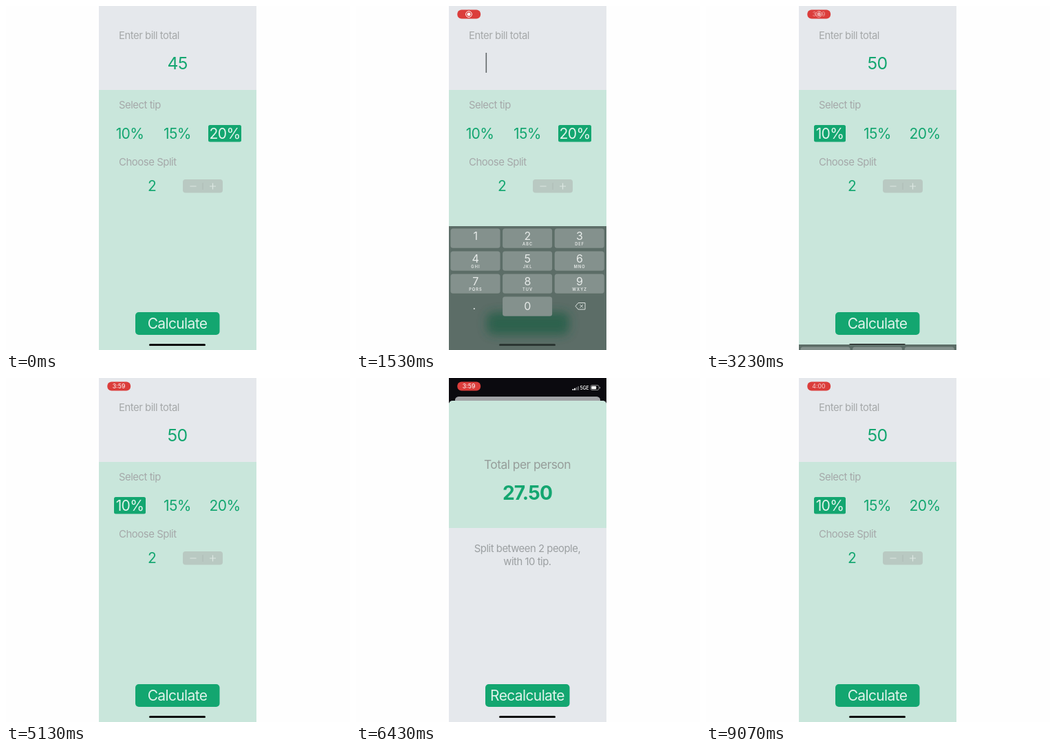
These frames come from a looping animation (500x500 px, 9.11 s). An HTML page:

```html
<!DOCTYPE html>
<html lang="en">
<head>
<meta charset="utf-8">
<title>Tip calculator</title>
<style>
  html, body { margin: 0; width: 100%; height: 100%; overflow: hidden; background: #fefefe; }
  svg { display: block; width: 100vw; height: 100vh; }
  text { font-family: Inter, "Liberation Sans", sans-serif; letter-spacing: -.03em; }
</style>
</head>
<body>
<svg id="stage" viewBox="0 0 500 500"></svg>
<script>
const LOOP = 9110;
const GREEN = '#13a670', MINT = '#c9e6db', PALE = '#e5e8ec', GREY = '#a5a8a9';
const ON_GREEN = '#e0f3eb', KEY = '#84918d', KEY_TEXT = '#e6eae8';
const KEYBOARD_HEIGHT = 180, SHEET_TRAVEL = 468;

const clamp = v => Math.min(1, Math.max(0, v));
const ramp = (t, start, length) => clamp((t - start) / length);
const easeOut = u => 1 - (1 - u) ** 3;
const easeInOut = u => u * u * (3 - 2 * u);
const mix = (a, b, u) => a + (b - a) * u;

const rect = (x, y, w, h, fill, r = 0, extra = '') =>
  `<rect x="${x}" y="${y}" width="${w}" height="${h}" rx="${r}" fill="${fill}" ${extra}/>`;
const label = (x, middle, size, fill, content, extra = 'text-anchor="middle"') =>
  `<text x="${x}" y="${middle + size * .36}" font-size="${size}" fill="${fill}" ${extra}>${content}</text>`;
const stroke = (d, color, width) =>
  `<path d="${d}" fill="none" stroke="${color}" stroke-width="${width}"/>`;
const button = (id, name) =>
  rect(188, 445, 122.5, 33, GREEN, 5) + label(249, 461.5, 21, ON_GREEN, name, `id="${id}" text-anchor="middle"`);
const homeBar = rect(208, 491, 82, 3, '#0b0b0b', 1.5);

const tips = [
  { name: '10%', x: 180, left: 157, width: 46 },
  { name: '15%', x: 249, left: 226, width: 46 },
  { name: '20%', x: 318, left: 294, width: 48 }
];

function mainScreen() {
  const left = 'text-anchor="start"';
  return rect(135, -10, 229, 520, PALE) +
    rect(135, 122, 229, 388, MINT) +
    label(164, 42.5, 14.8, GREY, 'Enter bill total', left) +
    label(249, 83, 24.8, GREEN, '', 'id="bill" text-anchor="middle"') +
    rect(188, 68, 1.6, 29, '#63686a', 0, 'id="caret"') +
    label(164, 143.5, 14.8, GREY, 'Select tip', left) +
    tips.map((tip, i) =>
      rect(tip.left, 173, tip.width, 24.5, GREEN, 2.5, `id="tipBox${i}"`) +
      label(tip.x, 185.3, 21.1, GREEN, tip.name, `id="tip${i}" text-anchor="middle"`)).join('') +
    label(164, 227, 14.9, GREY, 'Choose Split', left) +
    label(212, 261.3, 21, GREEN, '2') +
    rect(257, 252, 58, 19.5, '#b9c9c2', 4) +
    stroke('M286 257v10', '#aab8b2', .8) +
    stroke('M267.5 262h9M296 262h9M300.5 257.5v9', '#dde8e3', 1.2) +
    button('calculate', 'Calculate') + homeBar;
}

function keyboard() {
  const letters = ['', 'ABC', 'DEF', 'GHI', 'JKL', 'MNO', 'PQRS', 'TUV', 'WXYZ'];
  const key = (name, column, row, id) => {
    const x = 137.5 + column * 75.6, y = 323.5 + row * 33;
    const sub = letters[name - 1] || '';
    return rect(x, y, 72, 28.3, KEY, 3.5, `id="key${id}"`) +
      label(x + 36, y + (name > 0 ? 11 : 14), 16, KEY_TEXT, name) +
      (sub && label(x + 36.5, y + 22.5, 5.6, KEY_TEXT, sub,
        'text-anchor="middle" font-weight="600" style="letter-spacing:.2em"'));
  };
  return rect(135, 320, 229, KEYBOARD_HEIGHT + 5, '#5c6d67') +
    rect(190, 445, 120, 33, '#215f47', 10, 'filter="url(#soft)" opacity=".8"') +
    letters.map((_, i) => key(i + 1, i % 3, Math.floor(i / 3), i + 1)).join('') +
    key(0, 1, 3, 0) +
    label(171.5, 435, 16, KEY_TEXT, '.') +
    stroke('M323 431.5h10v9.5h-10l-4-4.75zM325.5 434l4.5 4.5m0-4.5l-4.5 4.5', '#dce2df', 1) +
    rect(208, 491, 82, 3, '#2b3632', 1.5);
}

function resultSheet() {
  return `<path d="M135 510V39q0-6 6-6H358q6 0 6 6V510z" fill="${PALE}"/>` +
    `<path d="M135 218V39q0-6 6-6H358q6 0 6 6V218z" fill="${MINT}"/>` +
    label(249, 126, 17.4, '#969d9a', 'Total per person') +
    label(249, 167.3, 28.2, GREEN, '27.50', 'text-anchor="middle" font-weight="700"') +
    label(249, 248, 14.8, '#9b9fa1', 'Split between 2 people,') +
    label(249, 266.5, 14.8, '#9b9fa1', 'with 10 tip.') +
    button('recalculate', 'Recalculate') + homeBar;
}

function statusIcons() {
  const bars = [0, 1, 2, 3].map(i =>
    rect(314.5 + i * 2.6, 16 - i * 1.3, 1.8, 1.8 + i * 1.3, i < 2 ? '#fff' : '#66666a', .4)).join('');
  return bars + label(332, 14.3, 7, '#fff', '5GE', 'text-anchor="middle" font-weight="500"') +
    rect(341, 10.5, 12, 7, 'none', 2, 'stroke="#aaa" stroke-width=".8"') +
    rect(342.2, 11.7, 7, 4.6, '#fff', 1) + rect(354, 12.8, 1, 2.4, '#aaa', .5);
}

document.getElementById('stage').innerHTML = `
  <defs>
    <clipPath id="screen">${rect(135, 0, 229, 500, '#000')}</clipPath>
    <clipPath id="card"><rect id="cardShape" x="135" y="0" width="229" height="520"/></clipPath>
    <filter id="soft" x="-30%" y="-80%" width="160%" height="260%"><feGaussianBlur stdDeviation="7"/></filter>
  </defs>
  ${rect(0, 0, 500, 500, '#fefefe')}
  <g clip-path="url(#screen)">
    ${rect(135, 0, 229, 500, '#0b0a0f')}
    <g id="main"><g clip-path="url(#card)">${mainScreen()}
      ${rect(135, -10, 229, 530, '#000', 0, 'id="shade"')}</g></g>
    <g id="keyboard">${keyboard()}</g>
    <g id="sheet">${resultSheet()}</g>
    <g id="icons">${statusIcons()}</g>
    <g id="pill">${rect(147.3, 5.4, 33.8, 13.1, '#db3d3b', 6)}
      <g id="record"><circle cx="164" cy="12" r="4.4" fill="none" stroke="#fff"/><circle cx="164" cy="12" r="2.5" fill="#fff"/></g>
      ${label(164, 12, 8.6, '#fbe9e9', '', 'id="clock" text-anchor="middle" font-weight="500" style="letter-spacing:0"')}
    </g>
  </g>`;

const parts = {};
document.querySelectorAll('#stage [id]').forEach(node => parts[node.id] = node);
const set = (id, name, value) => parts[id].setAttribute(name, value);
const fade = (id, value) => set(id, 'opacity', value);
const say = (id, value) => { if (parts[id].textContent !== value) parts[id].textContent = value; };

const billAt = t => t < 1100 ? '45' : t < 1300 ? '4' : t < 1900 ? '' : t < 2200 ? '5' : '50';
const pressed = (t, start) => t < start ? 1 : mix(.28, 1, ramp(t, start + 130, 300));

function render(t) {
  const lift = easeOut(ramp(t, 400, 480)) - easeOut(ramp(t, 2850, 590));
  const open = t < 7000 ? easeOut(ramp(t, 5200, 400)) : 1 - easeInOut(ramp(t, 7870, 480));

  const bill = billAt(t);
  say('bill', bill);
  const editing = t > 450 && t < 2850;
  set('caret', 'x', bill ? 250 + bill.length * 7.5 : 188.5);
  fade('caret', editing && (t - 1300) % 1000 < 600 ? 1 : 0);

  const chosen = t < 2800 ? 2 : 0;
  tips.forEach((_, i) => {
    fade('tipBox' + i, i === chosen ? 1 : 0);
    set('tip' + i, 'fill', i === chosen ? ON_GREEN : GREEN);
  });

  set('keyboard', 'transform', `translate(0 ${KEYBOARD_HEIGHT * (1 - lift)})`);
  fade('keyboard', lift > .001 ? 1 : 0);
  [[5, 1900], [0, 2200]].forEach(([key, at]) =>
    set('key' + key, 'fill', t >= at - 60 && t < at + 90 ? '#697772' : KEY));

  const scale = mix(1, .922, open);
  set('main', 'transform', `translate(${249.5 * (1 - scale)} ${27 * open}) scale(${scale})`);
  set('cardShape', 'y', open > .001 ? 0 : -10);
  set('cardShape', 'rx', 6 * open);
  fade('shade', .3 * open);
  set('sheet', 'transform', `translate(0 ${SHEET_TRAVEL * (1 - open)})`);
  fade('sheet', open > .001 ? 1 : 0);
  fade('icons', open);
  fade('calculate', pressed(t, 5140));
  fade('recalculate', pressed(t, 7690));

  const clock = ramp(t, 3080, 300);
  fade('pill', ramp(t, 300, 250));
  fade('record', 1 - clock);
  fade('clock', clock * mix(1, .75, ramp(t, 8850, 200)));
  say('clock', t < 8650 ? '3:59' : '4:00');
}

const began = performance.now();
function tick() {
  render((performance.now() - began) % LOOP);
  requestAnimationFrame(tick);
}
tick();
</script>
</body>
</html>
```
